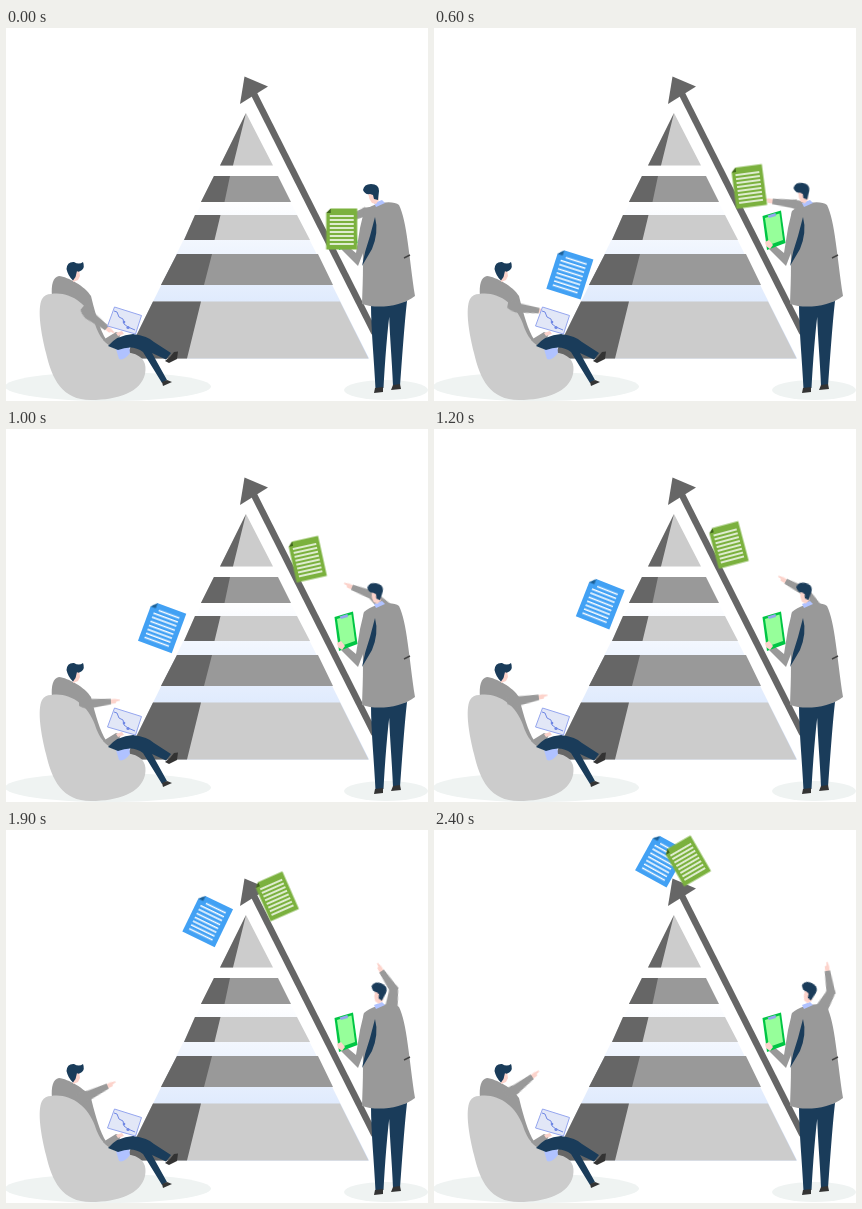
Write an HTML page without scripts that moves like this. It is 422 px wide and 373 px high and loops after 2.5 s.

```html
<!DOCTYPE html>
<html lang="en">
<head>
<meta charset="utf-8">
<title>Pyramid</title>
<style>
html, body { margin: 0; width: 100%; height: 100%; overflow: hidden; background: #fff; }
svg { display: block; width: 100vw; height: 100vh; }

.dark { fill: #666; }
.mid { fill: #999; }
.light { fill: #ccc; }
.navy { fill: #1a3c5a; }
.skin { fill: #fcd3cb; }
.shoe { fill: #333; }
.lines { fill: none; stroke: #fff; stroke-width: 1.5; }

/* The picture advances ten times a second; 96% is the last pose. */
.green, .blue, .head { animation: 2.5s steps(24) infinite; }
.green { animation-name: green; }
.blue { animation-name: blue, show; animation-timing-function: steps(24), step-end; }
.head { animation-name: head; }
.reach, .upper, .fore { animation: 2.5s steps(4) infinite; }
.reach { animation-name: reach; }
.upper { animation-name: upper; }
.fore { animation-name: fore; }

@keyframes green {
  0% { transform: translate(335.7px, 201px) rotate(0deg); }
  96%, 100% { transform: translate(253.3px, 31px) rotate(-30deg); }
}
@keyframes blue {
  0% { transform: translate(105.5px, 318px) rotate(14deg); }
  96%, 100% { transform: translate(227px, 30.5px) rotate(29deg); }
}
@keyframes show {
  0% { visibility: hidden; }
  12%, 100% { visibility: visible; }
}
@keyframes head {
  0% { transform: translate(373px, 176px) rotate(0deg); }
  96%, 100% { transform: translate(376px, 174.5px) rotate(27deg); }
}
@keyframes reach {
  0% { transform: translate(84px, 286px) rotate(40deg); }
  16% { transform: translate(84px, 281px) rotate(20deg); }
  32% { transform: translate(83px, 276px) rotate(2deg); }
  48% { transform: translate(83px, 271px) rotate(-7deg); }
  64% { transform: translate(82px, 267px) rotate(-16deg); animation-timing-function: steps(5); }
  84% { transform: translate(81px, 263px) rotate(-27deg); animation-timing-function: steps(3); }
  96%, 100% { transform: translate(80px, 259px) rotate(-34deg); }
}
@keyframes upper {
  0% { transform: translate(384px, 184px) rotate(-90deg); }
  16% { transform: translate(384px, 184px) rotate(-85deg); }
  32% { transform: translate(384px, 184px) rotate(-58deg); }
  48% { transform: translate(384px, 184px) rotate(-31deg); }
  64% { transform: translate(384px, 184px) rotate(-5deg); animation-timing-function: steps(5); }
  84% { transform: translate(384px, 184px) rotate(18deg); animation-timing-function: steps(3); }
  96%, 100% { transform: translate(384px, 184px) rotate(31deg); }
}
@keyframes fore {
  0% { transform: translateY(-25px) rotate(68deg); }
  16% { transform: translateY(-25px) rotate(85deg); }
  32% { transform: translateY(-25px) rotate(72deg); }
  48% { transform: translateY(-25px) rotate(59deg); }
  64% { transform: translateY(-25px) rotate(46deg); animation-timing-function: steps(5); }
  84% { transform: translateY(-25px) rotate(48deg); animation-timing-function: steps(3); }
  96%, 100% { transform: translateY(-25px) rotate(50deg); }
}
</style>
</head>
<body>
<svg viewBox="0 0 422 373" preserveAspectRatio="none">
  <defs>
    <linearGradient id="glow" gradientUnits="userSpaceOnUse" x1="0" y1="170" x2="0" y2="330">
      <stop stop-color="#fff"/><stop offset="1" stop-color="#cfe0fc"/>
    </linearGradient>
    <path id="hand" class="skin" d="M0-2.2L4-2.6L9-1.6L9-.4L5.500 .2L4.500 2L0 2.200Z"/>
  </defs>

  <g fill="#eff3f2">
    <ellipse cx="102" cy="358.500" rx="103" ry="14.500"/>
    <ellipse cx="380" cy="362" rx="42" ry="10"/>
  </g>

  <g id="pyramid">
    <path fill="url(#glow)" d="M240 85L363 330.500H119Z"/>
    <path class="light" d="M240 85L267 137.500H214ZM189 187H291L304 212H178ZM147 273.500H334L362.500 330.500H119Z"/>
    <path class="mid" d="M208 148H272L285 174H195ZM171 226H312L327 257H155Z"/>
    <path class="dark" d="M240 85L227 137.500H214ZM208 148H224L218.500 174H195ZM189 187H214.500L208.500 212H178ZM171 226H206L198 257H155ZM147 273.500H195L181 330.500H119Z"/>
  </g>

  <path d="M247.500 65L368.500 305" fill="none" stroke="#666" stroke-width="6.500"/>
  <path class="dark" d="M238.500 48.500L262 58.500L234 76Z"/>

  <g id="sitter">
    <path class="mid" d="M46 268C45 257 47 249 53 248C62 249 79 258 85 268C88 280 92 296 98 308L104 318L92 322Z"/>
    <path class="light" d="M45 266C64 263 82 276 89 296C95 315 106 322 125 325C138 328 141 336 139 346C135 364 112 372 85 372C56 372 46 351 40 325C35 305 31 281 36 271Q39 266 45 266Z"/>
    <path class="mid" d="M97 312L110 304L115 306L113 310L104 318Z"/>
    <g class="reach">
      <path class="mid" d="M-10-4Q-3-5 2-3.500L22-2.800V2.800L4 5.500Q-3 8-10 3Z"/>
      <use href="#hand" x="22"/>
    </g>
    <path class="skin" d="M66 243L73 242L74 248L72 252L67 254Z"/>
    <path class="navy" d="M60.500 241Q61 233.500 68 234Q73 237 77 234Q79 239 76 242Q72 245 71 243L69.500 249L67 252.500Q62 248 60.500 241Z"/>
    <path fill="#b0c2ff" d="M110 321L123 316L124 325Q118 333 113 331Z"/>
    <path class="navy" d="M102 318Q111 307 127 306Q142 308 148 314L165 325L160 331.500L146 325L161 352L156 355L137 324Q127 316 112 322Z"/>
    <path class="shoe" d="M159 333L164 329L168 324L172 323.500L171 331L163 335ZM156 354L161 352L166 354L157 358Z"/>
    <path d="M108.500 279L135.500 287.500L129.500 306L101.500 298Z" fill="#e2e7f7" stroke="#94a5ee"/>
    <path d="M108 283L111 284L113 289L117 291L118 296L122 299L129 302" fill="none" stroke="#7088e4"/>
    <g fill="#7088e4"><circle cx="118" cy="294" r="1.300"/><circle cx="122" cy="299.500" r="1.600"/></g>
    <path class="skin" d="M110 305L116 303L118 306L112 308Z"/>
  </g>

  <g id="stander">
    <g class="upper">
      <path class="mid" d="M-7 6L-4.500-23Q-4-29 0-29Q4-29 4.500-24L8 4Z"/>
      <g class="fore">
        <path class="mid" d="M2-4.500L-22-2.800V2.800L2 4.500Z"/>
        <use href="#hand" transform="translate(-22) scale(-1 1)"/>
      </g>
    </g>
    <path class="navy" d="M365 276H385C381 302 379 335 377.500 360L369.500 361C368 330 365 302 365 276ZM383 276L401 273C398 300 396 332 394 358L387 358C386 330 383 302 383 276Z"/>
    <path class="shoe" d="M369 360L377 359L377 364L368 365ZM387 357L394 356L395 361L385 362Z"/>
    <path class="mid" d="M358 183C368 174 387 172 393 177C401 193 403 229 409 268C395 279 370 281 356 276C357 250 358 225 355 205Z"/>
    <path class="mid" d="M358 183Q369 188 364 207L352 238L335 221L339 216L350 225L354 200Z"/>
    <path class="navy" d="M369 189Q373 204 366 221L356 238Q359 222 364 208Z"/>
    <path d="M398 230L404 227" stroke="#444" stroke-width="1.500"/>
    <path fill="#b0c2ff" d="M368 175L376 172L379 175L370 179Z"/>
    <g class="head">
      <path class="skin" d="M-11-11L-2-12L0-4L-3 0L-7-1L-9.500-5Z"/>
      <path class="navy" d="M-16-14Q-15-20-8-20Q0-20 0-13L-1-4L-5-5L-6-9L-9-10Q-14-9-16-14Z"/>
    </g>
    <path fill="#00c644" d="M328.500 188L347 182.500L351.500 215L333 222Z"/>
    <path fill="#96ff9a" d="M331 190L345.500 185.500L349 212L335 217Z"/>
    <path fill="#94a5ee" d="M333.500 187.500L341.500 185L342 188L335 190Z"/>
    <path class="skin" d="M331 214L335 212L339 217L336 221L332 218Z"/>
  </g>

  <g class="blue">
    <path fill="#42a1f4" d="M-12.500-21H18V21H-18V-15.500Z"/>
    <path fill="#1c6096" d="M-12.500-21V-15.500H-18Z"/>
    <path class="lines" d="M-9-14.500H13m-26 4.300h26m-26 4.300h26m-26 4.300h26m-26 4.300h26m-26 4.300h26m-26 4.300h26m-26 4.300h26"/>
  </g>
  <g class="green">
    <path fill="#7bb13e" d="M-11-20.500H15.500V20.500H-15.500V-16Z"/>
    <path fill="#41661d" d="M-11-20.500V-16H-15.500Z"/>
    <path class="lines" d="M-12-13H12m-24 4h24m-24 4h24m-24 4h24m-24 4h24m-24 4h24m-24 4h24m-24 4h24"/>
  </g>
</svg>
</body>
</html>
```
